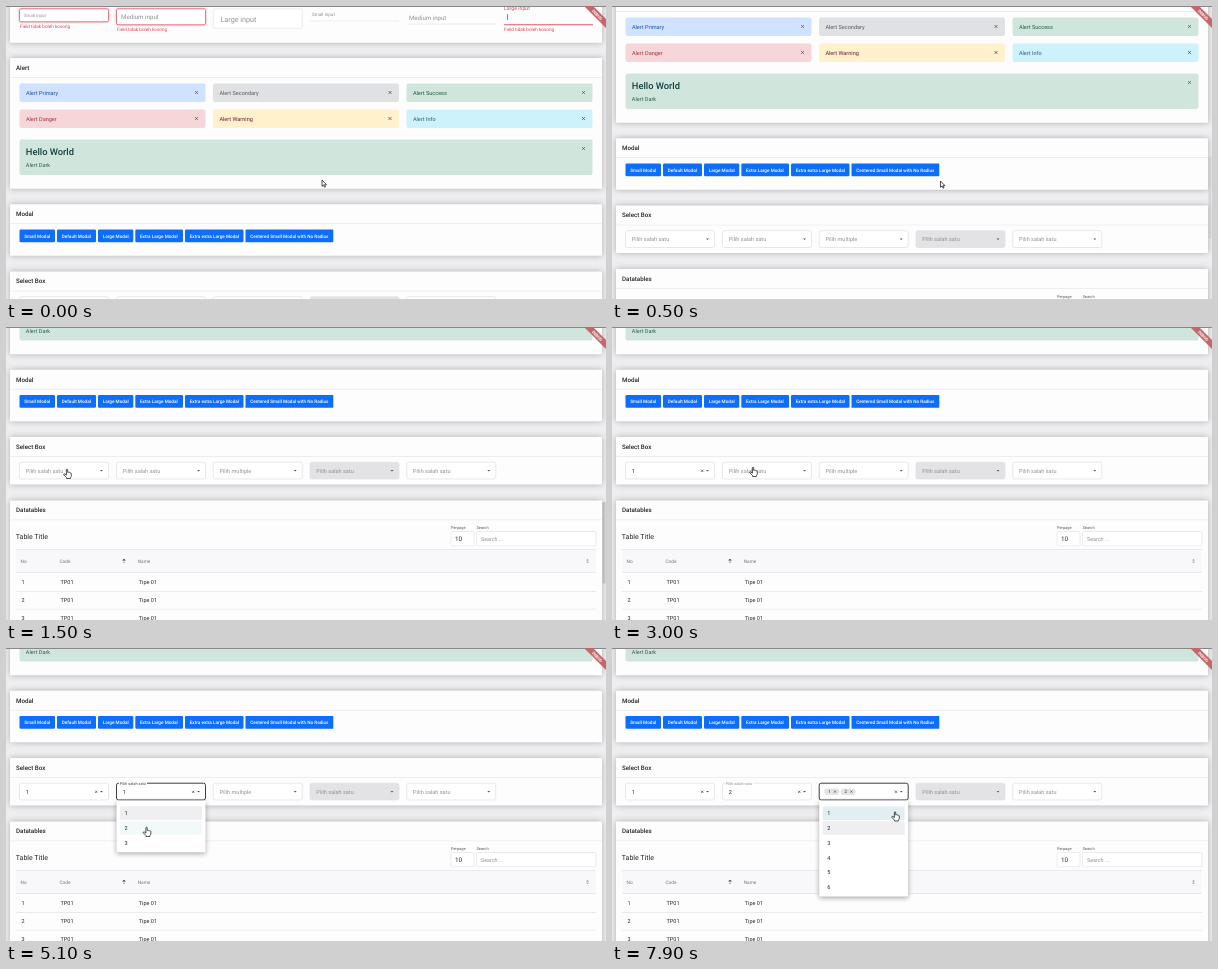
An HTML page with a canvas that plays this animation: 600 by 293 pixels, repeating every 8 s.

```html
<!DOCTYPE html>
<html lang="id">
<head>
<meta charset="utf-8">
<title>Form components</title>
<style>
html, body { margin: 0; width: 100%; height: 100%; overflow: hidden; background: #eeeef0; }
canvas { display: block; width: 600px; height: 293px; }
</style>
</head>
<body>
<canvas id="stage"></canvas>
<script>
const W = 600, H = 293, LOOP = 8000, STEP = 100;
const canvas = document.getElementById('stage');
const ratio = window.devicePixelRatio || 1;
canvas.width = W * ratio;
canvas.height = H * ratio;
const ctx = canvas.getContext('2d');
if ('textRendering' in ctx) ctx.textRendering = 'geometricPrecision';

const INK = '#26262a', MUTED = '#919196', LINE = '#dedee2', RED = '#d9434e';
const COLS = [13.5, 110.5, 207.2, 304, 400.8];

// [time, scroll]
const SCROLL = [[0, 0], [100, 0], [300, 20], [400, 39], [500, 66], [700, 117], [800, 117], [1000, 143], [1200, 155.5]];
// [time, x, y]
const POINTER = [
  [0, 316, 174], [300, 328.5, 175], [1200, 328.5, 175], [1500, 59, 142], [2000, 59, 142],
  [2300, 56, 160], [2600, 56, 160], [3000, 139, 140], [3500, 139, 140], [3700, 138, 166],
  [3900, 138, 168], [4000, 138, 173], [4300, 139, 141], [4700, 139, 141], [5000, 138.5, 179],
  [5500, 138.5, 179], [5900, 232, 141], [6100, 232, 141], [6400, 233, 163], [6500, 233, 163],
  [6700, 231, 176], [7500, 231, 177], [7900, 281, 163.5]
];

function sample(keys, t) {
  let i = 0;
  while (i < keys.length - 1 && keys[i + 1][0] <= t) i++;
  const a = keys[i], b = keys[i + 1];
  if (!b) return a.slice(1);
  const k = (t - a[0]) / (b[0] - a[0]);
  return a.slice(1).map((v, n) => v + (b[n + 1] - v) * k);
}

const ramp = (t, from, to) => Math.min(1, Math.max(0, (t - from) / (to - from)));
const within = (t, from, to) => t >= from && t < to;

// Text is placed by the middle of its capitals.
function label(str, x, mid, size, color = INK, weight = 400) {
  ctx.font = `${weight} ${size}px Roboto, sans-serif`;
  ctx.fillStyle = color;
  ctx.fillText(str, x, mid + size * 0.355);
}

function box(x, y, w, h, r, fill, stroke, width = 0.6) {
  ctx.beginPath();
  ctx.roundRect(x, y, w, h, r);
  if (fill) { ctx.fillStyle = fill; ctx.fill(); }
  if (stroke) { ctx.strokeStyle = stroke; ctx.lineWidth = width; ctx.stroke(); }
}

function shadowBox(x, y, w, h, r, fill, shade, blur, dy = 0) {
  ctx.save();
  ctx.shadowColor = shade;
  ctx.shadowBlur = blur * ratio;
  ctx.shadowOffsetY = dy * ratio;
  box(x, y, w, h, r, fill);
  ctx.restore();
}

function rule(x1, x2, y, color = LINE, width = 0.6) {
  ctx.fillStyle = color;
  ctx.fillRect(x1, y - width / 2, x2 - x1, width);
}

function cross(x, y, r, color = '#4a4a50') {
  ctx.strokeStyle = color;
  ctx.lineWidth = 0.75;
  ctx.beginPath();
  ctx.moveTo(x - r, y - r); ctx.lineTo(x + r, y + r);
  ctx.moveTo(x + r, y - r); ctx.lineTo(x - r, y + r);
  ctx.stroke();
}

function triangle(x, y, r, dir, color) {
  ctx.fillStyle = color;
  ctx.beginPath();
  ctx.moveTo(x - r, y); ctx.lineTo(x + r, y); ctx.lineTo(x, y + r * dir);
  ctx.fill();
}

function card(top, bottom, title) {
  shadowBox(4, top, 592, bottom - top, 1, '#fefdfe', 'rgba(0,0,0,.27)', 6);
  if (!title) return;
  label(title, 10, top + 9.6, 6.2, INK, 500);
  rule(4, 596, top + 19.4, '#e3e3e7');
}

function drawInputs() {
  const error = 'Field tidak boleh kosong';
  card(-70, 36.8);
  for (const [x, y, h] of [[13.5, 2.8, 13], [110.5, 2.8, 16]])
    shadowBox(x, y, 89, h, 1.5, '#fff', 'rgba(217,67,78,.6)', 3);
  box(13.5, 2.8, 89, 13, 1.5, '#fff', '#de6a73', 0.9);
  box(110.5, 2.8, 89, 16, 1.5, '#fff', '#de6a73', 0.9);
  box(207.2, 2.8, 89, 19.5, 1.5, '#fff', LINE);
  label('Small input', 18, 9.5, 4.4, MUTED);
  label('Medium input', 115, 10.8, 6.2, MUTED);
  label('Large input', 214.5, 13, 7.2, MUTED);
  label('Small input', 306, 8.8, 4.6, MUTED);
  label('Medium input', 403, 11.5, 6.1, MUTED);
  label('Large input', 498, 1.8, 5.2, RED);
  rule(304, 393, 15);
  rule(401, 490, 18);
  rule(498, 587, 18.8, RED, 0.9);
  ctx.fillStyle = '#3578c8';
  ctx.fillRect(501, 8, 0.8, 6);
  label(error, 14, 20.2, 4.65, RED);
  label(error, 111, 23.2, 4.65, RED);
  label(error, 498, 23.2, 4.65, RED);
}

function drawAlerts() {
  card(52, 182.8, 'Alert');
  const items = [
    ['Primary', '#cfe2ff', '#1f4f9c'], ['Secondary', '#e0e1e3', '#55595e'], ['Success', '#d0e6dc', '#1d5a40'],
    ['Danger', '#f6d6d9', '#a03540'], ['Warning', '#fff1cb', '#661a32'], ['Info', '#cdf2fb', '#2c5f86']
  ];
  items.forEach(([name, fill, ink], i) => {
    const x = 13.5 + (i % 3) * 193.5, y = i < 3 ? 77.5 : 103.5;
    box(x, y, 186, 18.6, 2, fill);
    label('Alert ' + name, x + 6.4, y + 9.2, 5.55, ink);
    cross(x + 177, y + 9, 1.4);
  });
  box(13.5, 133.5, 573, 35.4, 2, '#d0e6dc');
  label('Hello World', 19.8, 145.6, 9.3, '#133f40', 500);
  label('Alert Dark', 19.8, 159.4, 5.5, '#2c5c4c');
  cross(577.5, 142.5, 1.4);
}

function drawModals() {
  card(198.3, 249.8, 'Modal');
  const buttons = [
    ['Small Modal', 13.5, 49], ['Default Modal', 51, 90], ['Large Modal', 92, 127.3], ['Extra Large Modal', 129.3, 177],
    ['Extra extra Large Modal', 179, 237.5], ['Centered Small Modal with No Radius', 239.5, 327.3]
  ];
  for (const [name, left, right] of buttons) {
    box(left, 223.6, right - left, 12.6, left > 239 ? 0.4 : 1.2, '#0d6efd');
    label(name, left + 4.7, 229.9, 4.65, '#fff', 500);
  }
}

function drawSelect(i, { value = '', chips = [], focus = false, tag = false }) {
  const x = COLS[i], y = 290.7, mid = 299.1, disabled = i === 3;
  box(x, y, 89, 16.8, 2, disabled ? '#e3e2e4' : '#fff', focus ? '#3c3c42' : LINE, focus ? 1 : 0.7);
  if (tag) {
    ctx.fillStyle = '#fefdfe';
    ctx.fillRect(x + 2.5, y - 1.5, 28, 3);
    label('Pilih salah satu', x + 3.3, y, 3.9, focus ? '#45454a' : MUTED);
  }
  if (value) label(value, x + 6.2, mid, 5.6);
  else if (!chips.length && !tag) label(i === 2 ? 'Pilih multiple' : 'Pilih salah satu', x + 6.3, mid, 5.55, MUTED);
  chips.forEach((name, n) => {
    const left = x + 5 + n * 16.3;
    box(left, mid - 3.2, 15.2, 6.5, 3, '#e5e5e8');
    label(name, left + 4, mid, 4.4);
    cross(left + 10.8, mid, 1);
  });
  if (value || chips.length) cross(x + 76.8, mid + 0.2, 1.1);
  triangle(x + 82, mid - 0.5, 1.5, 1, '#55555a');
}

function drawSelects(t) {
  card(265.6, 313, 'Select Box');
  const second = t >= 5400 ? '2' : t >= 3900 ? '1' : '';
  const chips = t >= 7200 ? ['1', '2'] : t >= 6500 ? ['1'] : [];
  drawSelect(0, { value: t >= 2500 ? '1' : '', focus: within(t, 1800, 2600) });
  drawSelect(1, { value: second, focus: within(t, 3200, 5500), tag: t >= 3300 });
  drawSelect(2, { chips, focus: t >= 6000 });
  drawSelect(3, {});
  drawSelect(4, {});
}

function drawTable() {
  card(329, 560, 'Datatables');
  label('Table Title', 9.8, 364.8, 7, INK);
  label('Perpage', 445, 356.5, 3.95, '#55555a');
  label('Search', 470.5, 356.5, 3.95, '#55555a');
  box(445, 360, 23, 14.4, 1.5, '#fff', LINE);
  box(470.5, 360, 119.5, 14.4, 1.5, '#fff', LINE);
  label('10', 449, 367.2, 6.3);
  label('Search ...', 475, 367.2, 5.4, MUTED);
  ctx.fillStyle = '#f8f7f9';
  ctx.fillRect(10, 378.2, 580, 22.8);
  rule(10, 590, 378.2);
  rule(10, 590, 401.2);
  [['No', 14.5], ['Code', 53.5], ['Name', 131.7]].forEach(([name, x]) => label(name, x, 389.7, 4.75, '#77777c'));
  triangle(118, 389, 1.8, -1, '#2e2e33');
  triangle(118, 390.2, 1.4, 1, '#8a8a90');
  triangle(581.5, 389, 1.4, -1, '#8a8a90');
  triangle(581.5, 390.2, 1.4, 1, '#8a8a90');
  for (let n = 1; n < 5; n++) {
    const mid = 393 + n * 17.8;
    label(String(n), 15.5, mid, 5.5);
    label('TP01', 54.5, mid, 5.55);
    label('Tipe 01', 132.8, mid, 5.5);
    rule(10, 590, mid + 9);
  }
}

// fills maps an option number to its highlight colour.
function drawMenu(i, count, open, fills) {
  if (open <= 0) return;
  const x = COLS[i], y = 152.6, height = 7.3 + count * 14.75;
  ctx.save();
  ctx.globalAlpha = open;
  shadowBox(x, y, 89, height, 1.5, '#fff', 'rgba(0,0,0,.35)', 5, 1.5);
  for (let n = 1; n <= count; n++) {
    const mid = 165.2 + (n - 1) * 14.8;
    if (fills[n]) box(x + 3.5, mid - 6.8, 82, 13.6, 1, fills[n]);
    label(String(n), x + 8, mid, 5.6);
  }
  ctx.restore();
}

function drawMenus(t, pointerY) {
  const SELECTED = '#efeef0', HOVER = '#f1faf9', BOTH = '#e2eff2', PRESSED = '#cde1f4';
  const over = pointerY >= 158 ? Math.floor((pointerY - 158) / 14.8) + 1 : 0;
  const fade = (from, to) => ramp(t, from - 100, from + 100) * (1 - ramp(t, to - 100, to + 100));

  if (within(t, 1800, 2700)) drawMenu(0, 3, fade(1800, 2500), { [over]: t >= 2400 ? PRESSED : HOVER });
  if (within(t, 3200, 4100)) drawMenu(1, 3, fade(3200, 3900), { [over]: t >= 3800 ? PRESSED : HOVER });
  if (within(t, 4500, 5600)) drawMenu(1, 3, fade(4500, 5400), { 1: SELECTED, [over]: over === 1 ? BOTH : t >= 5300 ? PRESSED : HOVER });
  if (t >= 6000) {
    const fills = {};
    if (t < 6500) fills[over] = HOVER;
    else if (t < 6800) fills[1] = PRESSED;
    else {
      fills[1] = t >= 7700 ? BOTH : SELECTED;
      fills[2] = t >= 7600 ? SELECTED : t >= 7200 ? PRESSED : HOVER;
    }
    drawMenu(2, 6, ramp(t, 5900, 6100), fills);
  }
}

const ARROW = new Path2D('M0 0V6.3L1.5 5L2.5 7.2L3.5 6.7L2.5 4.7H4.5Z');
const HAND = new Path2D('M1.4 .6Q2.1 -.2 2.7 .6V3.4Q3.5 2.9 4 3.6Q4.7 3.1 5.2 3.9Q6.1 3.6 6.3 4.5V6.7Q6.2 8 5.4 8.6V9.5H1.6V8.7L-1.3 5.7Q-1.3 4.7 -.3 4.9L1.4 6.1Z');

function drawPointer(x, y, hand) {
  ctx.save();
  ctx.translate(x, y);
  ctx.lineJoin = 'round';
  ctx.lineWidth = 0.8;
  ctx.strokeStyle = '#222';
  ctx.fillStyle = '#fff';
  const shape = hand ? HAND : ARROW;
  ctx.fill(shape);
  ctx.stroke(shape);
  ctx.restore();
}

function drawBanner() {
  ctx.fillStyle = '#c4666a';
  ctx.beginPath();
  ctx.moveTo(578, 0); ctx.lineTo(587, 0); ctx.lineTo(600, 13); ctx.lineTo(600, 22);
  ctx.fill();
  ctx.save();
  ctx.translate(591.2, 8.8);
  ctx.rotate(Math.PI / 4);
  ctx.textAlign = 'center';
  label('DEBUG', 0, 0, 4, '#fff', 700);
  ctx.restore();
}

function draw(t) {
  const [scroll] = sample(SCROLL, t);
  const [x, y] = sample(POINTER, t);
  ctx.setTransform(ratio, 0, 0, ratio, 0, 0);
  ctx.fillStyle = '#eeeef0';
  ctx.fillRect(0, 0, W, H);

  ctx.save();
  ctx.translate(0, -scroll);
  drawInputs();
  drawAlerts();
  drawModals();
  drawSelects(t);
  drawTable();
  ctx.restore();

  const bar = ramp(t, 400, 600) * (1 - ramp(t, 1700, 2000));
  if (bar > 0) {
    ctx.globalAlpha = bar;
    box(596.4, 164.5 + (scroll - 117) * 0.27, 3, 81.7, 0.5, '#bfbfc2');
    ctx.globalAlpha = 1;
  }
  drawMenus(t, y);
  rule(0, W, 0.5, '#88888c', 1);
  drawBanner();
  drawPointer(x, y, t >= 1500);
}

function tick() {
  const t = performance.now() % LOOP;
  draw(Math.floor(t / STEP) * STEP);
  requestAnimationFrame(tick);
}
tick();
</script>
</body>
</html>
```
